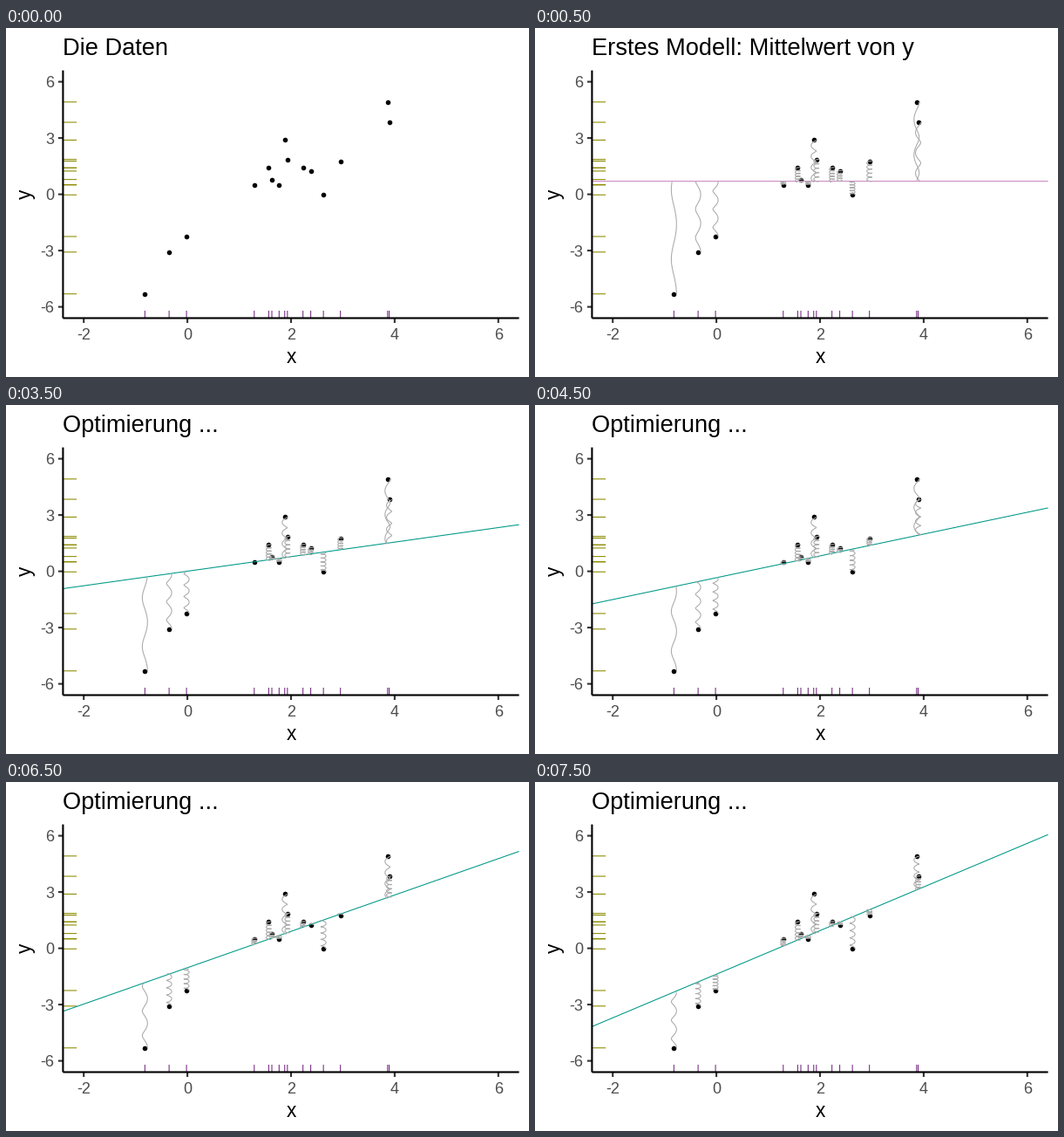
A matplotlib script for the animation above (8 s loop, 600 by 400 pixels).

```python
import numpy as np
import matplotlib.pyplot as plt
from matplotlib.animation import FuncAnimation

plt.rcParams.update({"font.family": "Liberation Sans", "path.snap": False})

INTERVAL, LOOP = 500, 8000
LEFT, RIGHT, TOP, BOTTOM = 65.4, 588.6, 48.6, 332.5
SLOPE_STEP = 0.1938
DIAMETER = 0.1

xs = np.array([-.82, -.353, -.017, 1.29, 1.57, 1.63, 1.77, 1.878, 1.93,
               2.23, 2.38, 2.625, 2.953, 3.863, 3.893])
ys = np.array([-5.31, -3.08, -2.25, .51, 1.41, .79, .5, 2.89, 1.86,
               1.41, 1.24, -.03, 1.77, 4.92, 3.84])


def px(x):
    return 208.1 + 59.45 * np.asarray(x)


def py(y):
    return 190.6 - 21.5 * np.asarray(y)


fig = plt.figure(figsize=(600 / 72, 400 / 72), dpi=72, facecolor="white")
ax = fig.add_axes([0, 0, 1, 1])
ax.set(xlim=(0, 600), ylim=(400, 0))
ax.axis("off")


def stroke(x, y, color, width=1.07, z=1):
    return ax.plot(x, y, color=color, lw=width, zorder=z,
                   solid_capstyle="butt")[0]


def label(x, y, text, size, color="black", ha="center", **kw):
    return ax.text(x, y, text, fontsize=size, color=color, ha=ha,
                   va="baseline", **kw)


# Axes, ticks and labels
for v in (-2, 0, 2, 4, 6):
    stroke([px(v)] * 2, [BOTTOM, BOTTOM + 5.5], "#333333", 2.1)
    label(px(v), 357, str(v), 18, "#4d4d4d")
for v in (-6, -3, 0, 3, 6):
    stroke([LEFT - 5.5, LEFT], [py(v)] * 2, "#333333", 2.1)
    label(55.3, py(v) + 6.5, str(v), 18, "#4d4d4d", "right")
stroke([LEFT, LEFT], [TOP, BOTTOM], "black", 2.1, 6)
stroke([LEFT, RIGHT], [BOTTOM, BOTTOM], "black", 2.1, 6)
label(327, 384, "x", 22.6)
label(28.5, 190.6, "y", 22.6, rotation=90, rotation_mode="anchor")
title = label(65, 31, "", 27.2, ha="left")

# Data points with their marginal rugs
ax.scatter(px(xs), py(ys), s=5.6 ** 2, color="black", linewidths=0, zorder=2)
for x, y in zip(px(xs), py(ys)):
    stroke([x, x], [BOTTOM - 8.5, BOTTOM], "#762a83", z=3)
    stroke([LEFT, LEFT + 15.7], [y, y], "#8b8b00", z=3)

model = stroke([], [], "black", z=4)
springs = [stroke([], [], "#ababab", z=5) for _ in xs]


def spring(x, start, end):
    """Coil from start to end that loosens with the squared distance."""
    length = abs(end - start)
    turns = length / (DIAMETER * (1 + length ** 2))
    n = max(2, int(50 * turns))
    angle = np.linspace(0, 2 * np.pi * turns, n)
    radius = DIAMETER / 2
    return (px(x + radius * np.cos(angle)),
            py(np.linspace(start, end, n) + radius * np.sin(angle)))


def update(i):
    t = i * INTERVAL
    fitted = t >= 500
    step = max(0, (t - 1500) // 1000)
    if not fitted:
        title.set_text("Die Daten")
    elif step == 0:
        title.set_text("Erstes Modell: Mittelwert von y")
    else:
        title.set_text("Optimierung ...")

    def predict(x):
        return ys.mean() + SLOPE_STEP * step * (x - xs.mean())

    ends = np.array([-2.4, 6.4])
    model.set_data([LEFT, RIGHT], py(predict(ends)))
    model.set_color("#009988" if step else "#cc88c4")
    model.set_visible(fitted)
    for line, x, y in zip(springs, xs, ys):
        line.set_data(*spring(x, y, predict(x)))
        line.set_visible(fitted)
    return [title, model, *springs]


anim = FuncAnimation(fig, update, frames=LOOP // INTERVAL, interval=INTERVAL,
                     init_func=lambda: update(0), repeat=True, repeat_delay=0,
                     blit=False)
plt.show()
```
